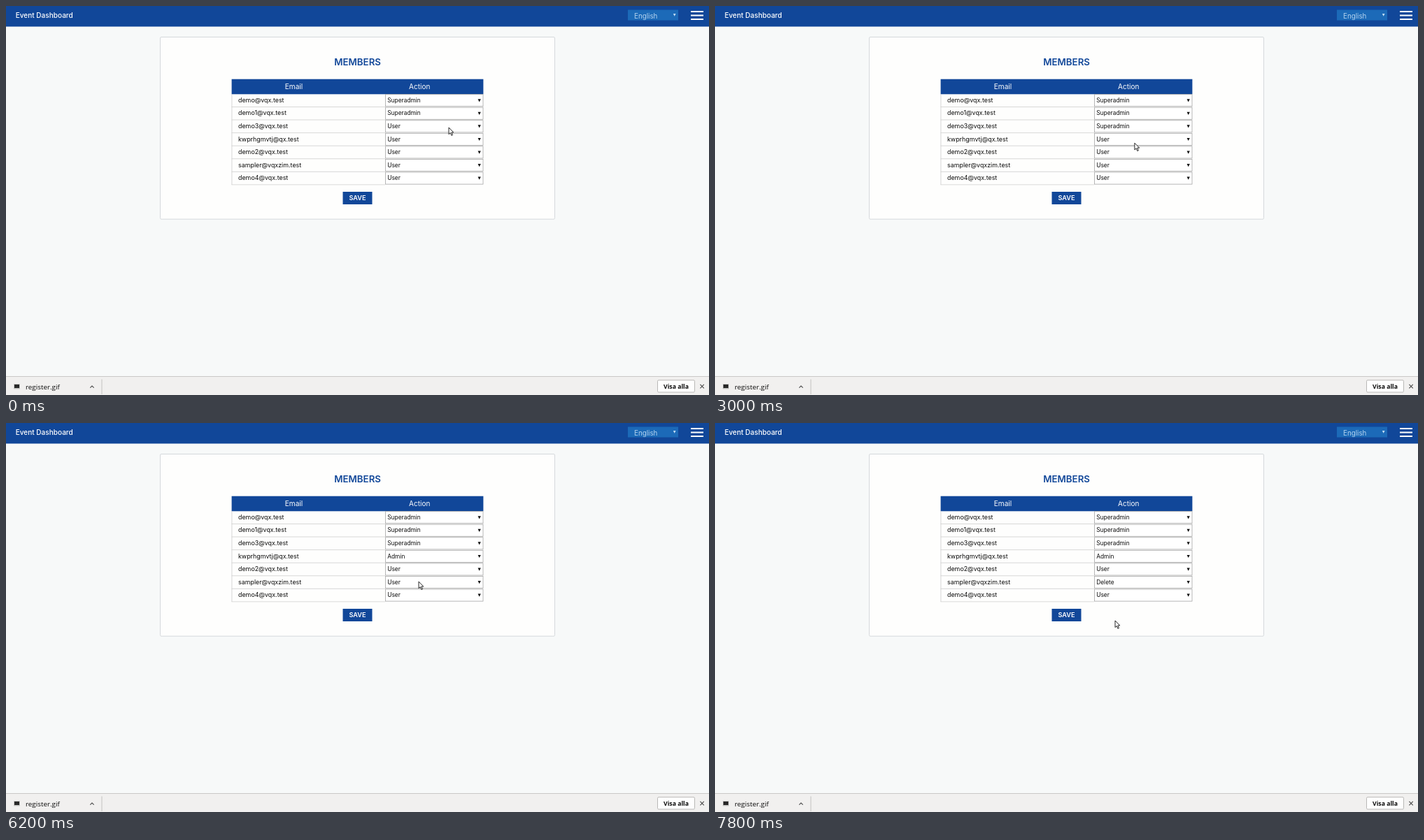
Animation, 1005 px wide and 557 px high, one loop 8000 ms. Source, as an HTML page:

```html
<!DOCTYPE html>
<html lang="en">
<head>
<meta charset="utf-8">
<title>Members</title>
<style>
html, body { margin: 0; width: 100%; height: 100%; overflow: hidden; background: #f7f9f9; }
svg { display: block; width: 1005px; height: 557px; font-family: Inter, "Open Sans", sans-serif; }
.sys { font-family: "Open Sans", "Noto Sans", sans-serif; }
#menu { filter: drop-shadow(0 1px 2px rgba(0, 0, 0, .6)); }
</style>
</head>
<body>
<svg id="stage" viewBox="0 0 1005 557"></svg>
<script>
const BLUE = '#114799', INK = '#0c0c0c', LOOP = 8000, TICK = 200;
const TOP = 126, ROW = 18.57, ITEM = 13.2;
const roles = ['User', 'Admin', 'Superadmin', 'Delete'];
const emails = ['demo@vqx.test', 'demo1@vqx.test', 'demo3@vqx.test', 'kwprhgmvtj@qx.test',
  'demo2@vqx.test', 'sampler@vqxzim.test', 'demo4@vqx.test'];

const menus = [
  { row: 2, open: 200, close: 1800 },
  { row: 3, open: 3400, close: 4400 },
  { row: 5, open: 6400, close: 7800 }
];

// pointer moves: start, end, x, y
const origin = [633, 174];
const moves = [
  [800, 1000, 631, 180], [1000, 1400, 611, 211], [2200, 3400, 596, 191], [3400, 3800, 590, 216],
  [5200, 6400, 590, 228], [6600, 6800, 589, 248], [6800, 7400, 572, 283]
];

const clamp = (v, lo, hi) => Math.min(hi, Math.max(lo, v));
const ease = p => p * p * (3 - 2 * p);

function pointerAt(time) {
  let [x, y] = origin;
  for (const [start, end, toX, toY] of moves) {
    const p = ease(clamp((time - start) / (end - start), 0, 1));
    x += (toX - x) * p;
    y += (toY - y) * p;
  }
  return [x, y];
}
const menuTop = row => TOP + (row + 1) * ROW - .7;
const itemAt = (row, y) => clamp(Math.floor((y - menuTop(row) - .7) / ITEM), 0, 3);

function roleAt(row, time) {
  const menu = menus.find(m => m.row === row && time >= m.close);
  if (menu) return roles[itemAt(row, pointerAt(menu.close)[1])];
  return row < 2 ? 'Superadmin' : 'User';
}

const stage = document.getElementById('stage');

function add(tag, attrs, parent = stage, content) {
  const el = document.createElementNS('http://www.w3.org/2000/svg', tag);
  for (const key in attrs) el.setAttribute(key, attrs[key]);
  if (content) el.textContent = content;
  return parent.appendChild(el);
}
const rect = (x, y, width, height, fill, more, parent) =>
  add('rect', { x, y, width, height, fill, ...more }, parent);
const text = (x, y, size, fill, content, more, parent) =>
  add('text', { x, y, 'font-size': size, fill, ...more }, parent, content);
const line = (d, stroke, width = 1) =>
  add('path', { d, stroke, 'stroke-width': width, fill: 'none' });
const arrow = (x, y, fill, r) =>
  add('path', { d: `M${x - r} ${y - r}h${2 * r}l${-r} ${2 * r}z`, fill });
const mid = { 'text-anchor': 'middle' };

function drawHeader() {
  rect(0, 0, 1005, 29.5, BLUE);
  text(13.7, 17.4, 10.05, '#fff', 'Event Dashboard', { 'font-weight': 500 });
  rect(889, 5.5, 72, 15, '#1c6ab8');
  text(898, 17.6, 9.8, '#b3d3ef', 'English');
  arrow(955.7, 12.8, '#c5dff5', 1.9);
  for (let i = 0; i < 3; i++) rect(979, 7 + i * 5.5, 18, 2, '#fff');
}

function drawTable() {
  rect(220.5, 44.5, 564, 260.7, '#fefefd', { stroke: '#d5d9dc', rx: 1.5 });
  text(502.6, 85, 13.3, BLUE, 'MEMBERS', { ...mid, 'font-weight': 600 });
  rect(322.6, 104.7, 359.8, 21.6, BLUE);
  text(411.5, 118.9, 10.1, '#fff', 'Email', mid);
  text(591.2, 118.9, 10, '#fff', 'Action', mid);
  line('M322.9 126V256', '#cfcfcf', .8);
  const labels = emails.map((email, i) => {
    const y = TOP + i * ROW;
    line(`M322.5 ${y + ROW - .1}H542`, '#cfcfcf', .8);
    text(332, y + 11.9, 8.9, INK, email);
    rect(542.4, y + .6, 139.6, 17.1, '#fff', { stroke: '#a6a6a6', 'stroke-width': .8 });
    arrow(676.7, y + 9.3, INK, 2.1);
    return text(545.2, y + 11.9, 8.4, INK, roleAt(i, 0));
  });
  rect(481.5, 266, 42, 18, BLUE);
  text(502.5, 278, 9.2, '#fff', 'SAVE', { ...mid, 'font-weight': 600 });
  return labels;
}

function drawDownloads() {
  rect(0, 530, 1005, 27, '#f1f0ef');
  line('M0 530.5H1005', '#c9c8c6');
  rect(11, 541, 9, 7.6, '#c4c4c2', { rx: .8 });
  rect(12, 542, 7, 5, '#282828');
  text(28, 549.2, 9.85, INK, 'register.gif', { class: 'sys' });
  line('M120.3 546.7l2.7-2.7 2.7 2.7', '#4b4b4b', 1.1);
  line('M137 534.5V556', '#c3c2c0');
  rect(931.5, 535.8, 53, 17.2, '#fefefe', { stroke: '#b9b8b6', rx: 1.5 });
  text(958, 547.6, 8.7, INK, 'Visa alla', { ...mid, class: 'sys', 'font-weight': 700 });
  line('M992.4 541.9l5.4 5.4M997.8 541.9l-5.4 5.4', '#505050', 1.2);
}

drawHeader();
const labels = drawTable();
drawDownloads();

const list = add('g', { id: 'menu' });
rect(542.4, .3, 139.8, 54, '#fff', { stroke: '#7890bd', 'stroke-width': .9 }, list);
const mark = rect(542.9, 0, 138.8, ITEM, '#2794f4', {}, list);
const items = roles.map((role, i) => text(545, 9.9 + i * ITEM, 8.4, INK, role, {}, list));

const pointer = add('path', {
  d: 'M0 0V9.7L2.2 7.6 3.9 11.4 5.5 10.7 3.8 7H6.8Z',
  fill: '#fff', stroke: '#111', 'stroke-width': .9, 'stroke-linejoin': 'round'
});

function show(time) {
  const [x, y] = pointerAt(time);
  pointer.setAttribute('transform', `translate(${x} ${y})`);
  labels.forEach((label, i) => { label.textContent = roleAt(i, time); });

  const menu = menus.find(m => time >= m.open && time < m.close);
  list.setAttribute('visibility', menu ? 'visible' : 'hidden');
  if (!menu) return;
  const active = itemAt(menu.row, y);
  list.setAttribute('transform', `translate(0 ${menuTop(menu.row)})`);
  mark.setAttribute('y', .7 + active * ITEM);
  items.forEach((el, i) => el.setAttribute('fill', i === active ? '#e4f2ff' : INK));
}

const start = performance.now();
function frame() {
  const time = (performance.now() - start) % LOOP;
  show(Math.floor(time / TICK) * TICK);
  requestAnimationFrame(frame);
}
frame();
</script>
</body>
</html>
```
